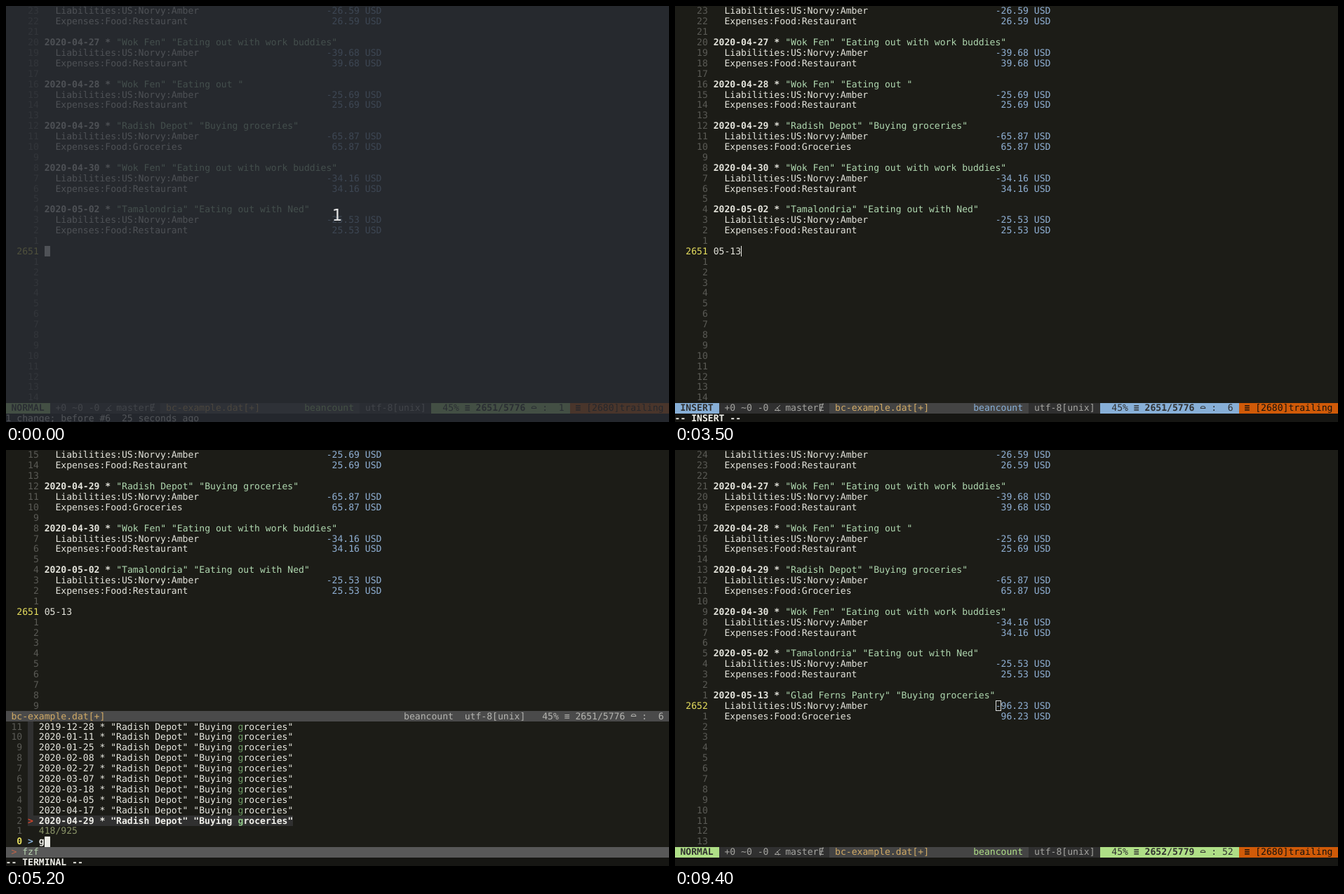
An HTML page with a canvas that plays this animation: 945 px wide and 593 px high, repeating every 9500 ms.

```html
<!DOCTYPE html>
<html lang="en">
<head>
<meta charset="utf-8">
<title>Ledger entry in a terminal editor</title>
<style>
html, body { margin: 0; width: 100%; height: 100%; overflow: hidden; background: #1c1c17; }
canvas { display: block; }
</style>
</head>
<body>
<canvas id="stage" width="945" height="593"></canvas>
<script>
const ctx = document.getElementById('stage').getContext('2d');
const W = 945, H = 593, LOOP = 9500;

// The terminal is a grid of 9 x 17 cells, scaled down and shifted left by half a pixel.
const K = 14.89 / 17, LEFT = -0.5, BASE = 13;
const px = col => Math.round(col * 9 * K + LEFT);
const py = row => Math.round(row * 17 * K);

const C = {
  bg: '#1c1c17', msg: '#161613', text: '#e4e4dc', white: '#f0f0ea', str: '#afd7af',
  num: '#8fafd3', dim: '#5a5a55', now: '#e6de5e', dark: '#303030',
  barB: '#303030', barC: '#444444', barOff: '#4a4a4a', barFzf: '#585858',
  grey: '#a4a4a0', tan: '#d2ab66', green: '#afdf87', blue: '#87afd7',
  warn: '#d05a08', red: '#d0452c', match: '#6c9c64', matchOn: '#92cc8a',
  info: '#8a9468', cursor: '#ebebe6'
};

const CARD = 'Liabilities:US:Norvy:Amber';
const EATING = 'Eating out with work buddies', BUYING = 'Buying groceries';
const LUNCH = 'Wok Fen', SHOP = 'Radish Depot', GROCER = 'Glad Ferns Pantry';
const entry = (date, payee, note, sum, kind = 'Restaurant') => ({ date, payee, note, sum, kind });
const ledger = [
  entry('2020-04-26', LUNCH, EATING, '26.59'),
  entry('2020-04-27', LUNCH, EATING, '39.68'),
  entry('2020-04-28', LUNCH, 'Eating out ', '25.69'),
  entry('2020-04-29', SHOP, BUYING, '65.87', 'Groceries'),
  entry('2020-04-30', LUNCH, EATING, '34.16'),
  entry('2020-05-02', 'Tamalondria', 'Eating out with Ned', '25.53')
];
const added = entry('2020-05-13', GROCER, BUYING, '96.23', 'Groceries');

const YEAR = '"Allowed contributions for one year"';
const allItems = [
  '2018-01-01 * ' + YEAR,
  '2019-03-20 * "Filing taxes for 2018"',
  '2019-03-21 * "FEDERAL TAXPYMT"',
  '2019-03-23 * "STATE TAX & FINANC PYMT"',
  '2019-01-01 * ' + YEAR,
  '2020-03-22 * "Filing taxes for 2019"',
  '2020-03-23 * "STATE TAX & FINANC PYMT"',
  '2020-03-25 * "FEDERAL TAXPYMT"',
  '2020-01-01 * ' + YEAR,
  '2020-05-03 * ""'
];
const shopItems = ['2019-12-28', '2020-01-11', '2020-01-25', '2020-02-08', '2020-02-27',
  '2020-03-07', '2020-03-18', '2020-04-05', '2020-04-17', '2020-04-29']
  .map(d => `${d} * "${SHOP}" "${BUYING}"`);
const grocerItems = ['2018-10-02', '2018-10-17', '2018-10-22', '2018-11-20', '2019-07-05',
  '2019-09-21', '2019-10-14', '2020-01-03', '2020-01-19', '2020-02-19']
  .map(d => `${d} * "${GROCER}" "${BUYING}"`);

function box(col, row, cols, color) {
  ctx.fillStyle = color;
  const x = px(col), y = py(row);
  ctx.fillRect(x, y, px(col + cols) - x, py(row + 1) - y);
}

function put(col, row, str, color, bold) {
  ctx.save();
  ctx.setTransform(K, 0, 0, K, LEFT, 0);
  ctx.font = (bold ? 'bold ' : '') + '14.95px "DejaVu Sans Mono", "DejaVu Sans", monospace';
  ctx.textRendering = 'geometricPrecision';
  ctx.textBaseline = 'alphabetic';
  ctx.textAlign = 'left';
  ctx.fillStyle = color;
  ctx.fillText(str, col * 9, row * 17 + BASE);
  ctx.restore();
}

// Small line symbols of the status bar, in pixels from the cell corner.
function symbol(col, row, color, path) {
  ctx.save();
  ctx.translate(px(col), py(row));
  ctx.strokeStyle = color;
  ctx.lineWidth = 1;
  ctx.beginPath();
  path();
  ctx.stroke();
  ctx.restore();
}
const segment = (col, row, color) => symbol(col, row, color, () => {
  ctx.moveTo(1, 7.5);
  ctx.ellipse(4.5, 7.5, 3.5, 3, 0, Math.PI, 2 * Math.PI);
  ctx.closePath();
});
const angle = (col, row, color) => symbol(col, row, color, () => {
  ctx.moveTo(9, 3);
  ctx.lineTo(1, 10.5);
  ctx.lineTo(9.5, 10.5);
  ctx.moveTo(4, 6);
  ctx.quadraticCurveTo(7, 7.5, 6.5, 11.5);
});

function numbers(first, last, cur, label, end, bold) {
  for (let r = first; r <= last; r++) {
    const s = r === cur ? label : String(Math.abs(r - cur));
    put(end - s.length, r, s, r === cur ? C.now : C.dim, bold && r === cur);
  }
}

function drawEntry(e, row) {
  if (row >= 0) {
    put(7, row, e.date + ' *', C.text, true);
    put(20, row, `"${e.payee}" "${e.note}"`, C.str);
  }
  if (row + 1 < 0) return;
  put(9, row + 1, CARD, C.text);
  put(58, row + 1, `-${e.sum} USD`, C.num);
  put(9, row + 2, 'Expenses:Food:' + e.kind, C.text);
  put(59, row + 2, e.sum + ' USD', C.num);
}

function drawLedger(top) {
  ledger.forEach((e, i) => drawEntry(e, i * 4 - 1 - top));
}

function statusBar(mode, pos, col) {
  const r = 38, hue = mode === 'INSERT' ? C.blue : C.green;
  box(0, r, 8, hue);
  box(8, r, 20, C.barB);
  box(28, r, 36, C.barC);
  box(64, r, 13, C.barB);
  box(77, r, 25, hue);
  box(102, r, 19, C.warn);
  put(1, r, mode, C.dark, true);
  put(9, r, '+0 ~0 -0', C.grey);
  angle(18, r, C.grey);
  put(20, r, 'master\u0246', C.grey);
  put(29, r, 'bc-example.dat[+]', C.tan);
  put(54, r, 'beancount', hue);
  put(65, r, 'utf-8[unix]', C.grey);
  put(79, r, '45%', C.dark);
  put(83, r, '\u2261', C.dark, true);
  put(85, r, pos, C.dark, true);
  segment(95, r, C.dark);
  put(97, r, ': ' + String(col).padStart(2), C.dark);
  put(103, r, '\u2261', '#16120e', true);
  put(105, r, '[2680]trailing', '#16120e');
}

function editing(t) {
  const insert = t >= 1500;
  const typed = '05-13'.slice(0, [2500, 2800, 3000, 3400, 3500].filter(k => t >= k).length);
  drawLedger(0);
  numbers(0, 37, 23, '2651', 6);
  put(7, 23, typed, C.text);
  if (insert) {
    ctx.fillStyle = C.cursor;
    ctx.fillRect(px(7 + typed.length), py(23), 1, 15);
  } else {
    box(7, 23, 1, C.cursor);
  }
  statusBar(insert ? 'INSERT' : 'NORMAL', '2651/5776', typed.length + 1);
  if (insert) put(0, 39, '-- INSERT --', C.white, true);
  else put(0, 39, '1 change; before #6  25 seconds ago', C.white);
}

function drawItem(str, row, from, len, on) {
  const color = on ? C.white : '#e8e8e0';
  if (on) box(4, row, str.length + 2, C.dark);
  put(6, row, str.slice(0, from), color, on);
  put(6 + from, row, str.slice(from, from + len), on ? C.matchOn : C.match, on);
  put(6 + from + len, row, str.slice(from + len), color, on);
}

function picking(t) {
  drawLedger(8);
  numbers(0, 24, 15, '2651', 6);
  put(7, 15, '05-13', C.text);

  box(0, 25, 121, C.barOff);
  put(1, 25, 'bc-example.dat[+]', C.tan);
  put(72, 25, 'beancount  utf-8[unix]', '#b4b4b0');
  put(97, 25, '45% \u2261 2651/5776', '#b4b4b0');
  segment(113, 25, '#b4b4b0');
  put(115, 25, ':  6', '#b4b4b0');

  const n = [5200, 5400, 5500, 6000].filter(k => t >= k).length;
  const query = 'glad'.slice(0, n);
  const items = n === 0 ? allItems : n === 1 ? shopItems : grocerItems;
  const from = n === 1 ? items[0].indexOf('groceries') : 14;
  numbers(26, 37, 37, '0', 3, true);
  if (t >= 4300) {
    for (let r = 26; r < 36; r++) box(4, r, 1, C.dark);
    items.forEach((s, i) => drawItem(s, 26 + i, from, n, i === 9));
    put(4, 35, '>', C.red, true);
    put(6, 36, ['925', '418', '97', '74', '62'][n] + '/925', C.info);
  }
  put(4, 37, '>', C.blue, true);
  put(6, 37, query, C.white, true);
  box(6 + n, 37, 1, C.cursor);

  box(0, 38, 121, C.barFzf);
  put(1, 38, '>', '#c0644a');
  put(3, 38, 'fzf', '#b8d4b0');
  put(0, 39, '-- TERMINAL --', C.white, true);
}

function finished(t) {
  drawLedger(0);
  drawEntry(added, 23);
  numbers(0, 37, 24, '2652', 6);
  if (t < 7500) {
    box(8, 26, 1, C.cursor);
  } else if (t < 9400) {
    box(58, 24, 1, C.cursor);
    put(58, 24, '-', C.bg);
  } else {
    ctx.strokeStyle = '#dcdfe0';
    ctx.lineWidth = 1;
    ctx.strokeRect(px(58) + 0.5, py(24) + 0.5, 7, 14);
  }
  statusBar('NORMAL', '2652/5779', 52);
}

function countdown() {
  ctx.fillStyle = 'rgba(40, 44, 52, 0.8)';
  ctx.fillRect(0, 0, W, H);
  ctx.font = '23px "DejaVu Sans", sans-serif';
  ctx.textAlign = 'center';
  ctx.textBaseline = 'alphabetic';
  ctx.fillStyle = '#e6e6e6';
  ctx.fillText('1', 472, 306);
}

function draw(t) {
  ctx.fillStyle = C.bg;
  ctx.fillRect(0, 0, W, H);
  box(0, 39, 121, C.msg);
  if (t < 4200) editing(t);
  else if (t < 7200) picking(t);
  else finished(t);
  if (t < 100) countdown();
}

const start = performance.now();
function tick() {
  draw((performance.now() - start) % LOOP);
  requestAnimationFrame(tick);
}
tick();
</script>
</body>
</html>
```
